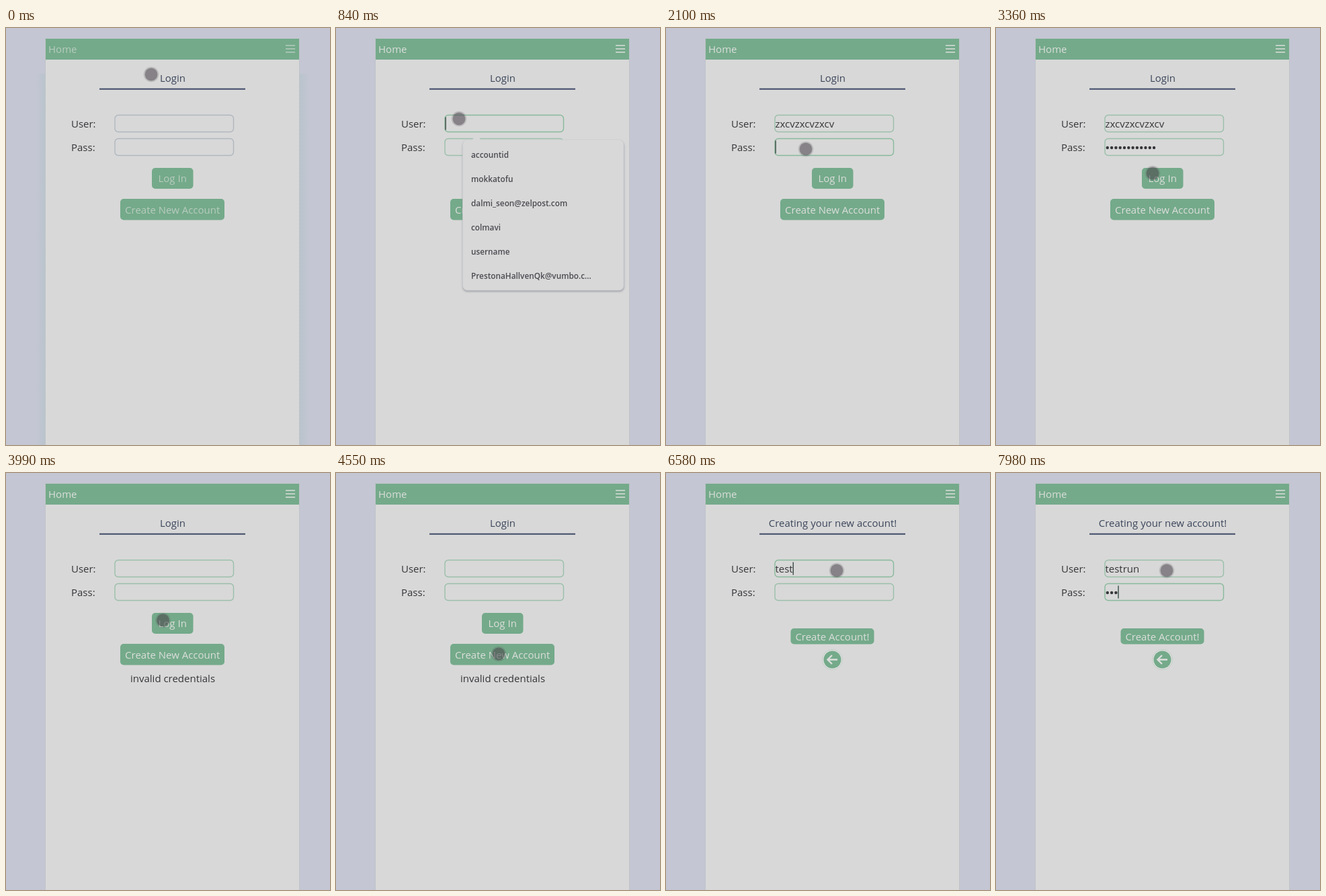
Recreate the animation shown at these times as an HTML page. Size 482 px wide and 620 px high, loop 8000 ms.

```html
<!DOCTYPE html>
<html lang="en">
<head>
<meta charset="utf-8">
<title>Login form</title>
<style>
  html, body { margin: 0; width: 100%; height: 100%; overflow: hidden; background: #c4c6d3; }
  svg { display: block; width: 482px; height: 620px; font: 15px "Open Sans", "Noto Sans", sans-serif; fill: #36363a; }
  .mid { text-anchor: middle; }
  .green { fill: #74aa8a; }
  .light { fill: #dcdedc; }
  .field { fill: #d8d8d8; stroke: #9abfaa; stroke-width: 1.4; }
  .title { fill: #3c465a; }
  #items { font-size: 11.8px; font-weight: 600; fill: #4b4b52; }
</style>
</head>
<body>
<svg viewBox="0 0 482 620">
  <defs>
    <filter id="soft" x="-20%" y="-20%" width="140%" height="140%"><feGaussianBlur stdDeviation="1.6"/></filter>
    <linearGradient id="edge">
      <stop offset="0" stop-color="#b8c4cc" stop-opacity="0"/>
      <stop offset=".04" stop-color="#b8c4cc"/>
      <stop offset=".96" stop-color="#b8c4cc"/>
      <stop offset="1" stop-color="#b8c4cc" stop-opacity="0"/>
    </linearGradient>
  </defs>
  <rect width="482" height="620" fill="#c4c6d3"/>
  <rect id="haze" x="44" y="68" width="408" height="552" fill="url(#edge)"/>
  <rect x="58.5" y="15.5" width="378" height="610" fill="#d8d8d8" stroke="#bfc3c9"/>
  <rect class="green" x="59" y="16" width="377" height="31"/>
  <g id="bar">
    <text class="light" x="63" y="37">Home</text>
    <path d="M416 26h14M416 31h14M416 36h14" stroke="#dcdedc" stroke-width="1.4"/>
  </g>
  <rect x="139" y="89.7" width="217" height="2" fill="#3f4b68"/>
  <text x="97" y="148">User:</text>
  <text x="97" y="183">Pass:</text>
  <rect id="userBox" class="field" x="162" y="129.5" width="176.5" height="25" rx="5"/>
  <rect id="passBox" class="field" x="162" y="164.5" width="176.5" height="25" rx="5"/>
  <text id="user" x="162.5" y="148"></text>
  <g id="dots"></g>
  <rect id="caret" width="1.4" height="19" fill="#3a4a46"/>

  <g id="login">
    <text class="mid title" x="248" y="80">Login</text>
    <rect class="green" x="217" y="208" width="61.5" height="31" rx="5"/>
    <rect class="green" x="170" y="254" width="155" height="31.5" rx="5"/>
    <g id="labels">
      <text class="mid light" x="247.7" y="229">Log In</text>
      <text class="mid light" x="247.7" y="276">Create New Account</text>
    </g>
    <text id="error" class="mid" x="248" y="311">invalid credentials</text>
  </g>

  <g id="signup">
    <text class="mid title" x="248" y="80">Creating your new account!</text>
    <rect class="green" x="185.5" y="231" width="124" height="23.5" rx="5"/>
    <text class="mid light" x="247.5" y="248.5">Create Account!</text>
    <circle cx="247.5" cy="277.5" r="15" fill="#dedfde" stroke="#b9c9bf" stroke-width=".8"/>
    <circle class="green" cx="247.5" cy="277.5" r="13"/>
    <path d="M255 277.5h-14M247 271l-6.5 6.5 6.5 6.5" fill="none" stroke="#dcdedc" stroke-width="2.4"/>
  </g>

  <g id="menu">
    <rect x="188.5" y="168" width="240" height="224" rx="7" fill="#777b85" opacity=".6" filter="url(#soft)"/>
    <path d="M201 167l8-7 8 7z" fill="#d8d8d8"/>
    <rect x="188.5" y="166" width="239.5" height="224" rx="7" fill="#d8d8d8" stroke="#cbccd0" stroke-width=".7"/>
    <path d="M202 168l7-7 7 7z" fill="#d8d8d8"/>
    <g id="items"></g>
  </g>

  <g id="pointer">
    <circle r="11.3" fill="#5a555a" opacity=".22"/>
    <circle r="9.4" fill="#443f46" opacity=".45"/>
  </g>
</svg>
<script>
const LOOP = 8000, STEP = 70, DOT_GAP = 6.3;
const $ = id => document.getElementById(id);
const svgNode = (parent, tag, attrs, text = "") => {
  const node = document.createElementNS("http://www.w3.org/2000/svg", tag);
  for (const key in attrs) node.setAttribute(key, attrs[key]);
  node.textContent = text;
  return parent.appendChild(node);
};
const show = (id, on) => { $(id).style.display = on ? "" : "none"; };
const clamp = x => Math.min(1, Math.max(0, x));
const between = (t, a, b) => t >= a && t < b;
const typed = (t, start, end, count) => Math.ceil(clamp((t - start) / (end - start)) * count);

["accountid", "mokkatofu", "dalmi_seon@zelpost.com", "colmavi", "username", "PrestonaHallvenQk@vumbo.c..."]
  .forEach((name, i) => svgNode($("items"), "text", { x: 201, y: 193 + 36 * i }, name));
const dots = Array.from({ length: 12 }, (_, i) =>
  svgNode($("dots"), "circle", { cx: 165.8 + DOT_GAP * i, cy: 178, r: 2.2 }));

// time, x, y of each place where the pointer rests or turns
const stops = [
  [0, 216, 69], [630, 183, 135], [1610, 183, 135], [2030, 208, 180], [2870, 208, 180],
  [3290, 233, 216], [3920, 233, 216], [4410, 242, 269], [4760, 242, 269],
  [5320, 241, 152], [5530, 241, 152], [5880, 254, 145], [LOOP, 254, 145]
];
function pointerAt(t) {
  const i = stops.findIndex(stop => stop[0] > t);
  const [t0, x0, y0] = stops[i - 1], [t1, x1, y1] = stops[i];
  const u = (t - t0) / (t1 - t0), k = u * u * (3 - 2 * u);
  return [x0 + (x1 - x0) * k, y0 + (y1 - y0) * k];
}

const LOGIN_SENT = 3500, PAGE_SWITCH = 4620;
const focuses = [
  { field: "user", start: 700, typedBy: 1680, end: 2030 },
  { field: "pass", start: 2030, typedBy: 2870, end: 3290 },
  { field: "user", start: 5320, typedBy: 7140, end: 7420 },
  { field: "pass", start: 7420, typedBy: LOOP, end: LOOP }
];

function drawCaret(t, focus, user, passLength) {
  if (!focus) return show("caret", false);
  const inUser = focus.field === "user";
  const count = inUser ? user.length : passLength;
  const width = inUser ? (count && $("user").getComputedTextLength()) : count * DOT_GAP;
  const typing = count > 0 && t <= focus.typedBy;
  const idle = t - (t < focus.typedBy ? focus.start : focus.typedBy);
  show("caret", typing || idle % 1060 < 530);
  $("caret").setAttribute("x", 162.4 + width);
  $("caret").setAttribute("y", inUser ? 132.5 : 167.5);
}

function draw(t) {
  const settle = clamp(t / 630);
  $("haze").style.opacity = 1 - settle;
  $("bar").style.opacity = $("labels").style.opacity = 0.65 + 0.35 * settle;

  const signup = t >= PAGE_SWITCH;
  show("login", !signup);
  show("signup", signup);
  show("error", t >= LOGIN_SENT);
  show("menu", between(t, 700, 1190) || between(t, 5320, 6090));

  let user = "", passLength = 0;
  if (signup) {
    user = "testrun".slice(0, typed(t, 6020, 7140, 7));
    passLength = typed(t, 7560, 7980, 3);
  } else if (t < LOGIN_SENT) {
    user = "zxcvzxcvzxcv".slice(0, typed(t, 1120, 1680, 12));
    passLength = typed(t, 2240, 2870, 12);
  }
  $("user").textContent = user;
  dots.forEach((dot, i) => { dot.style.display = i < passLength ? "" : "none"; });

  const focus = focuses.find(({ start, end }) => between(t, start, end));
  for (const name of ["user", "pass"])
    $(name + "Box").style.stroke = settle < 0.5 ? "#b0b7bf" : focus && focus.field === name ? "#88b99b" : "";
  drawCaret(t, focus, user, passLength);

  $("pointer").setAttribute("transform", `translate(${pointerAt(t)})`);
}

const started = performance.now();
function tick() {
  const t = (performance.now() - started) % LOOP;
  draw(Math.floor(t / STEP) * STEP);
  requestAnimationFrame(tick);
}
tick();
</script>
</body>
</html>
```
